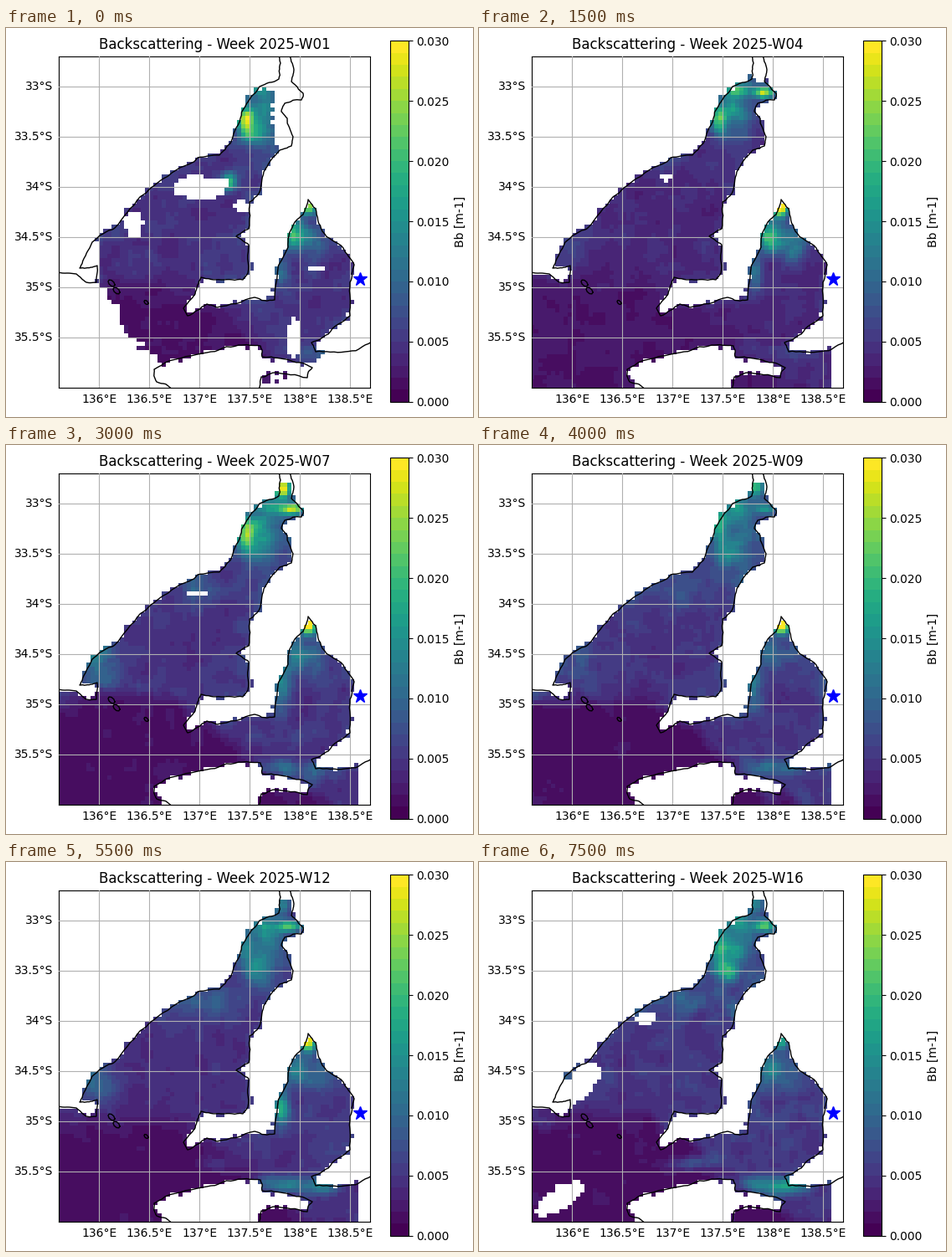
A matplotlib script for the animation above (8 s loop, 558x465 px).

```python
import numpy as np
import matplotlib.pyplot as plt
from matplotlib.animation import FuncAnimation
from matplotlib.path import Path

W, H, DPI = 558, 465, 100
LEFT, RIGHT, TOP, BOTTOM = 63.4, 435.4, 33.8, 429.8
DEG, CELL = 120, 5          # pixels per degree, pixels per 1/24 degree cell
WEEKS = 16

# Key points of the coasts, in stage pixels
WEST = [(326, 30), (328, 42), (326, 61), (303, 70), (293, 82), (280, 108), (268, 138),
        (255, 152), (229, 155), (188, 180), (160, 202), (130, 239), (112, 248),
        (103, 256), (94, 274), (88, 287), (103, 286), (109, 284), (108, 304),
        (96, 304), (84, 294), (62, 292)]
EAST = [(338, 30), (344, 50), (341, 64), (355, 78), (353, 86), (333, 90), (329, 100),
        (336, 108), (343, 130), (341, 141), (327, 146), (308, 172), (302, 198),
        (291, 208), (290, 240), (275, 249), (290, 259), (289, 293), (283, 301),
        (257, 301), (233, 298), (226, 318), (212, 335), (217, 344), (240, 330),
        (252, 334), (297, 322), (321, 325), (337, 262), (343, 236), (355, 223),
        (361, 205), (370, 216), (378, 243), (403, 263), (416, 283), (411, 304),
        (411, 344), (385, 366), (365, 376), (370, 387), (405, 387), (437, 375)]
SOUTH = [(200, 432), (180, 423), (177, 408), (190, 400), (240, 388), (278, 379),
         (304, 380), (306, 393), (335, 396), (366, 406), (360, 418), (320, 412),
         (305, 417), (302, 432)]


def rough(points, seed, passes=3, amount=0.045):
    """Midpoint displacement: a ragged shore through the key points."""
    rng = np.random.default_rng(seed)
    p = np.array(points, float)
    for _ in range(passes):
        d = np.diff(p, axis=0)
        normal = np.column_stack([-d[:, 1], d[:, 0]])
        mid = p[:-1] + d / 2 + normal * rng.normal(0, amount, (len(d), 1))
        p = np.insert(p, np.arange(1, len(p)), mid, axis=0)
    return p


def islet(x, y, r):
    a = np.linspace(0, 2 * np.pi, 9)
    return np.column_stack([x + r * np.cos(a), y + r * np.sin(a + 0.5)])


west, east, south = rough(WEST, 1), rough(EAST, 2), rough(SOUTH, 3)
shores = [west, east, south, islet(126, 305, 4), islet(132, 314, 4), islet(167.5, 328, 2.5)]

xe = np.arange(LEFT - 2, 422, CELL)
ye = np.arange(TOP - 4, 430, CELL)
X, Y = np.meshgrid(xe[:-1] + CELL / 2, ye[:-1] + CELL / 2)


def inside(points):
    pts = np.column_stack([X.ravel(), Y.ravel()])
    return Path(points).contains_points(pts).reshape(X.shape)


def blur(a, passes):
    for _ in range(passes):
        p = np.pad(a, 1, mode="edge")
        a = sum(p[i:i + a.shape[0], j:j + a.shape[1]]
                for i in range(3) for j in range(3)) / 9
    return a


def noise(rng, passes):
    n = blur(rng.normal(size=X.shape), passes)
    return n / n.std()


def ellipse(x, y, rx, ry, deg=0):
    """Squared distance from the centre, 1 on the rim."""
    a, dx, dy = np.radians(deg), X - x, Y - y
    u, v = dx * np.cos(a) + dy * np.sin(a), dy * np.cos(a) - dx * np.sin(a)
    return (u / rx) ** 2 + (v / ry) ** 2


land = (inside([*west, (62, 30)]) | inside([*east, (437, 30)]) | inside(south)).astype(float)
shore = blur(land, 3)
sea = (blur(land, 1) + 0.08 * noise(np.random.default_rng(4), 0) < 0.6) & (Y > 43)

# Turbid places: x, y, width, height, usual strength (1e-3 per metre)
PLACES = dict(
    head=(306, 98, 25, 46, 9), tip=(342, 76, 13, 7, 16), neck=(331, 50, 9, 12, 9),
    crown=(308, 74, 15, 8, 4), flank=(287, 107, 9, 18, 10), knee=(298, 129, 12, 12, 5),
    shelf=(240, 168, 45, 20, 2.5), spit=(267, 183, 9, 11, 0), bays=(112, 262, 22, 26, 3),
    apex=(361, 214, 9, 11, 26), lee=(347, 249, 13, 18, 9), strip=(330, 292, 9, 24, 7),
    bay=(373, 256, 18, 20, 4), basin=(385, 312, 28, 38, 0), strait=(336, 386, 34, 10, 6),
    cape=(375, 388, 20, 10, 2), gyre=(252, 360, 24, 8, 0))

keys = {}


def week(n, ocean, gulf, holes=(), shift=0, swath=None, **strength):
    """Store one weekly field and its cloud-free mask."""
    rng = np.random.default_rng(100 + n)
    edge = 300 + shift + 0.75 * np.maximum(0, X - 205) + 6 * noise(rng, 4)
    v = ocean + (gulf - ocean + 2 * shore) / (1 + np.exp((Y - edge) / 6))
    for name, (*where, usual) in PLACES.items():
        v = v + strength.get(name, usual) * np.exp(-ellipse(*where))
    v = v * np.exp(0.1 * noise(rng, 3) + 0.07 * noise(rng, 1))
    ragged = 1 + 0.15 * noise(rng, 1)
    ok = sea.copy()
    if swath:
        ok &= ellipse(*swath) < 1 + 0.04 * noise(rng, 1)
    for hole in holes:
        ok &= ellipse(*hole) > ragged
    keys[n] = v, ok


week(0, 1.9, 4.5, swath=(275, 250, 165, 180), shelf=0, bays=0, flank=15, spit=14,
     apex=20, lee=13, strip=4, strait=3,
     holes=[(232, 190, 30, 16), (154, 235, 10, 15), (370, 289, 12, 3),
            (344, 370, 7, 24), (340, 105, 21, 50), (283, 212, 9, 7)])
week(3, 2.1, 3.7, head=7, tip=22, crown=15, flank=12, knee=1, shelf=1, lee=16, bay=9,
     strait=2, holes=[(224, 179, 8, 4), (335, 46, 16, 18)])
week(6, 1.7, 4.7, tip=23, neck=21, crown=10, flank=14, bays=5,
     holes=[(228, 177, 13, 3)])
week(8, 1.6, 5, tip=12, neck=15, knee=7, lee=6)
week(10, 1.7, 3.8, head=8, flank=4, shelf=3.5, lee=4, strait=9)
week(13, 1.6, 5.3, shift=14, head=10, shelf=4.5, bays=9, lee=17, strip=22, bay=10,
     basin=5, strait=10, cape=15, gyre=8,
     holes=[(218, 191, 8, 18, 10), (197, 240, 38, 11, 129), (374, 294, 14, 4, 25)])
week(15, 1.6, 5, knee=10, neck=6, apex=14, strip=2, strait=9, cape=8, gyre=7,
     holes=[(118, 266, 38, 16, 137), (199, 186, 12, 8), (98, 400, 34, 13, -35)])


def field(n):
    a = max(k for k in keys if k <= n)
    b = min(k for k in keys if k >= n)
    t = (n - a) / (b - a) if b > a else 0
    v = (1 - t) * keys[a][0] + t * keys[b][0]
    ok = keys[a if t < 0.5 else b][1]
    return np.ma.masked_where(~ok, v / 1000)


fig = plt.figure(figsize=(W / DPI, H / DPI), dpi=DPI, facecolor="white")
ax = fig.add_axes([LEFT / W, 1 - BOTTOM / H, (RIGHT - LEFT) / W, (BOTTOM - TOP) / H])
cax = fig.add_axes([459 / W, 1 - 446.8 / H, 21.6 / W, 431.6 / H])

mesh = ax.pcolormesh(xe, ye, field(0), cmap=plt.get_cmap("viridis", 30),
                     vmin=0, vmax=0.03, zorder=0)
for line in shores:
    ax.plot(*line.T, color="black", lw=1, zorder=3)
ax.plot(LEFT + 3 * DEG, TOP + 2.22 * DEG, "*", color="blue", ms=12, zorder=4)

lons = np.arange(136, 138.6, 0.5)
lats = np.arange(33, 35.6, 0.5)
ax.set_xticks(LEFT + (lons - 135.6) * DEG, [f"{v:g}°E" for v in lons])
ax.set_yticks(TOP + (lats - 32.7) * DEG, [f"{v:g}°S" for v in lats], va="center")
ax.set(xlim=(LEFT, RIGHT), ylim=(BOTTOM, TOP))
ax.tick_params(length=0, pad=5)
ax.set_axisbelow(False)
ax.grid(color="#b0b0b0", lw=0.8)
title = ax.set_title("")

fig.colorbar(mesh, cax=cax, ticks=np.arange(7) * 0.005, format="%.3f", label="Bb [m-1]")


def draw(n):
    mesh.set_array(field(n))
    title.set_text(f"Backscattering - Week 2025-W{n + 1:02d}")
    return mesh, title


anim = FuncAnimation(fig, draw, frames=WEEKS, interval=500, repeat=True, repeat_delay=0)
plt.show()
```
